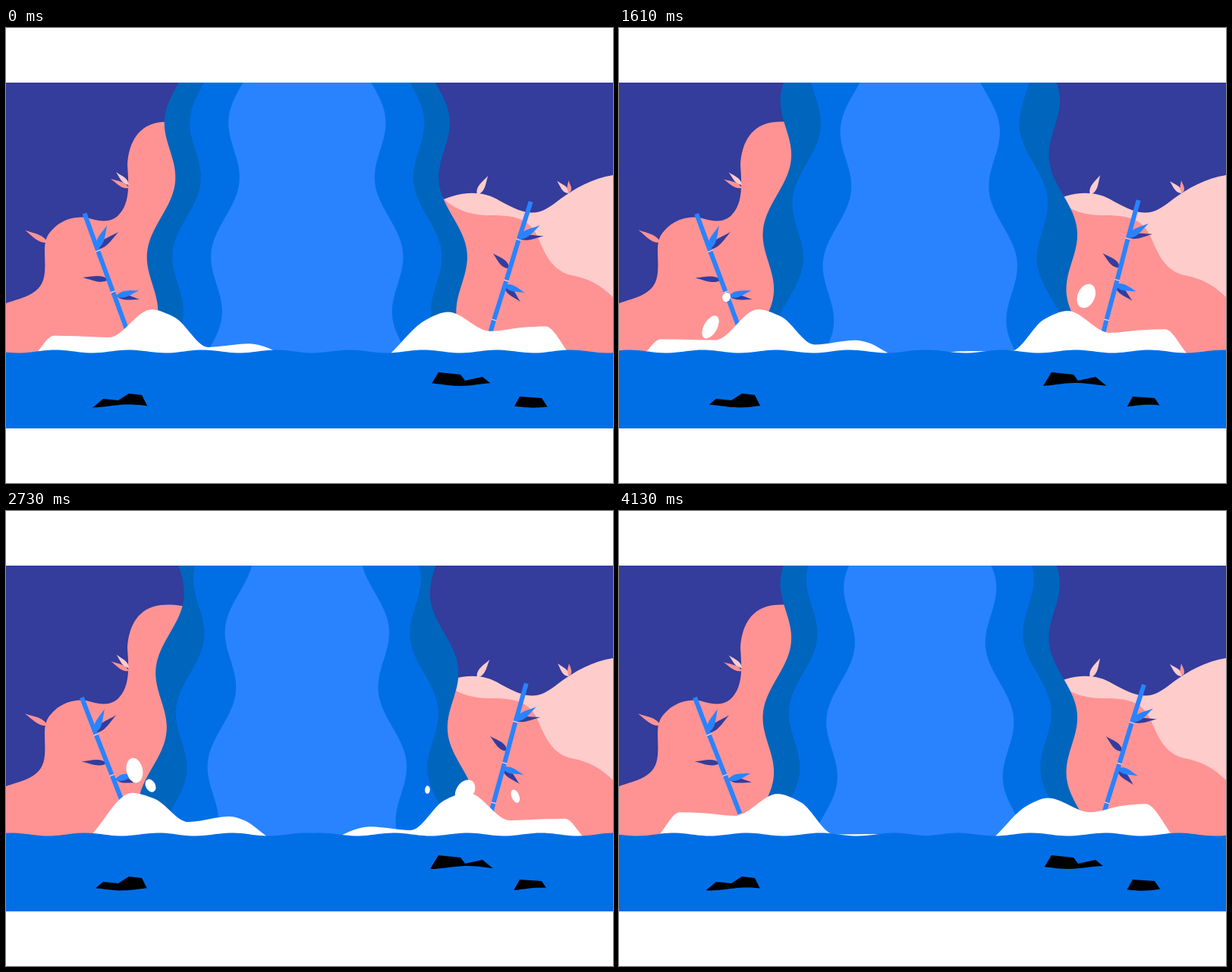
Write an HTML page that moves like this. It is 800x600 px and loops after 4200 ms.

```html
<!DOCTYPE html>
<html lang="en">
<head>
<meta charset="utf-8">
<title>Waterfall</title>
<style>
html, body { margin: 0; width: 100%; height: 100%; overflow: hidden; background: #fff; }
svg { display: block; width: 100vw; height: 100vh; }
</style>
</head>
<body>
<svg id="stage" viewBox="0 0 800 600">
  <defs><clipPath id="frame"><rect y="72" width="800" height="456"/></clipPath></defs>
  <g id="scene" clip-path="url(#frame)"></g>
</svg>
<script>
const LOOP = 4200, STEP = 70, TAU = Math.PI * 2;
const C = {
  sky: '#343c9c', pink: '#ff9393', pale: '#ffcccc', white: '#fff',
  deep: '#0065bd', water: '#006fe6', bright: '#2983ff'
};
const scene = document.getElementById('scene');

function add(tag, attrs, parent = scene) {
  const el = document.createElementNS('http://www.w3.org/2000/svg', tag);
  for (const key in attrs) el.setAttribute(key, attrs[key]);
  parent.appendChild(el);
  return el;
}
const shape = (fill, d = '', parent = scene) => add('path', { fill, d }, parent);
const mix = (a, b, k) => a + (b - a) * k;
const mod = (a, n) => ((a % n) + n) % n;
const polygon = pts => 'M' + pts.map(p => p[0].toFixed(2) + ',' + p[1].toFixed(2)).join('L') + 'Z';
const swing = (t, period, peak) => Math.cos(TAU * (t / period - peak));

function leaf(x, y, tipX, tipY, width, fill, parent) {
  const length = Math.hypot(tipX - x, tipY - y);
  const angle = Math.atan2(tipY - y, tipX - x) * 360 / TAU;
  const side = w => `${length * 0.3},${w * 1.3} ${length * 0.6},${w * 0.4}`;
  const back = w => `${length * 0.6},${w * 0.4} ${length * 0.3},${w * 1.3}`;
  shape(fill, `M0,0C${side(-width)} ${length},0C${back(width)} 0,0Z`, parent)
    .setAttribute('transform', `translate(${x} ${y}) rotate(${angle})`);
}

// Land
add('rect', { y: 72, width: 800, height: 456, fill: C.sky });
shape(C.pink, 'M0,363C22,355 49,352 51,322C53,300 46,281 60,267C72,253 90,248 106,250C120,254 137,259 149,246C165,229 161,200 160,180C162,150 175,127 205,124Q222,122 240,127V432H0Z');
shape(C.pale, 'M565,232C590,217 625,211 651,228C690,250 702,246 722,232C746,213 770,199 800,194V432H565Z');
shape(C.pink, 'M566,214C588,240 610,247 640,247C672,247 690,252 701,276C712,302 721,320 745,326C770,331 785,340 800,355V432H566Z');

// Swaying plants: root, swing in degrees, period, peak and resting swing
const plants = [];
function plant(x, y, degrees, period, peak, rest) {
  const el = add('g', {});
  plants.push({ el, x, y, degrees, period, peak, rest });
  return el;
}
let g = plant(55, 283, 2, 700, 0.2, 0);
leaf(55, 283, 25, 267, 5.5, C.pink, g);
g = plant(162, 209, 2, 840, 0.25, 0);
leaf(162, 207, 145, 190, 4.5, C.pale, g);
leaf(162, 211, 138, 199, 4.5, C.pink, g);
g = plant(621, 219, 5, 840, 0.25, -0.6);
leaf(621, 220, 634, 194, 6, C.pale, g);
g = plant(741, 216, 3, 840, 0.25, -0.4);
leaf(742, 218, 726, 202, 5, C.pale, g);
leaf(743, 217, 741, 201, 4, C.pink, g);

function bamboo(group, nodes, leaves) {
  leaves.forEach(l => leaf(...l, group));
  for (let i = 0; i + 1 < nodes.length; i++) {
    const [x1, y1] = nodes[i], [x2, y2] = nodes[i + 1];
    const length = Math.hypot(x2 - x1, y2 - y1);
    const ux = (x2 - x1) / length, uy = (y2 - y1) / length;
    const at = (along, side) => [x1 + ux * along - uy * side, y1 + uy * along + ux * side];
    shape(C.bright, polygon([at(0.7, 3), at(0.7, -3), at(length - 0.7, -3), at(length - 0.7, 3)]), group);
    const [ax, ay] = at(length, 3.5), [bx, by] = at(length, -3.5);
    add('path', { d: `M${ax},${ay}L${bx},${by}`, stroke: C.pale, 'stroke-width': 1.2 }, group);
  }
}
bamboo(plant(164, 410, 2.25, 700, 0.13, 0.64), [[103, 244], [121, 294], [141, 348], [160, 400], [165, 414]], [
  [119, 292, 148, 269, 6, C.sky], [119, 292, 133, 260, 6.5, C.bright], [135, 332, 101, 329, 5.5, C.sky],
  [145, 353, 176, 358, 5, C.sky], [145, 354, 175, 346, 6, C.bright]
]);
bamboo(plant(640, 400, 1.3, 1050, 0.95, 0.7), [[691, 228], [675, 279], [659, 333], [643, 385], [636, 410]], [
  [674, 277, 708, 274, 5, C.sky], [674, 278, 703, 260, 6.5, C.bright], [663, 317, 641, 297, 6, C.sky],
  [656, 339, 678, 361, 6, C.sky], [656, 339, 684, 349, 6, C.bright]
]);

// Waterfall layers
const layers = [[C.deep, 0, 420], [C.water, 33.5, 350], [C.bright, 84.5, 525]]
  .map(([fill, inset, period]) => ({ el: shape(fill), inset, period }));

function fall({ inset, period }, t) {
  const left = [], right = [];
  for (let y = 70; y <= 436; y += 4) {
    const x = 216 + inset - 0.13 * (y - 161) + 12.5 * Math.sin(TAU * ((y - 161) / 177 - t / period));
    left.push([x, y]);
    right.unshift([793.6 - x, y]);
  }
  return polygon(left.concat(right));
}

// Spray: each volley goes up on the right, then on the left
const FLIGHT = 600;
const ARC = { x: 596, span: 90, top: 341, gravity: 235 };
const BEAD_ARC = { x: 568, span: -22, top: 367, gravity: 40 };
const drops = [];
function drop(side, launch, size, arc = ARC) {
  drops.push({ el: add('ellipse', { fill: C.white }), side, launch, size, arc });
}
[642, 1478, 2088, 2670].forEach((launch, i) => {
  const sides = [[1, launch], [-1, launch + 412]];
  sides.forEach(([side, time]) => drop(side, time, 1));
  if (i % 2) return;
  sides.forEach(([side, time]) => drop(side, time + 140, 0.55));
  drop(i ? 1 : -1, launch + 300, 0.33, BEAD_ARC);
});

function moveDrop({ el, side, launch, size, arc }, t) {
  const u = (t - launch) / FLIGHT;
  const visible = u > 0 && u < 1;
  el.setAttribute('visibility', visible ? 'visible' : 'hidden');
  if (!visible) return;
  const x = arc.x + arc.span * u, y = arc.top + arc.gravity * (u - 0.45) ** 2;
  const squash = Math.exp(-(((u - 0.68) / 0.07) ** 2));
  const tilt = (40 - 75 * u) * side * Math.sign(arc.span);
  el.setAttribute('rx', (12 - 3.5 * u) * size);
  el.setAttribute('ry', (16.5 - 5.5 * squash) * size);
  el.setAttribute('transform', `translate(${side > 0 ? x : 800 - x} ${y}) rotate(${tilt})`);
}

// Foam: swells are born near the fall, drift outwards, grow and die
const FOAM = { period: 525, lead: 105, base: 428, born: 20, life: 1240 };
const crest = age => [
  454 + 0.245 * age,
  FOAM.base - 57 * Math.sin(Math.PI * (age - FOAM.born) / 1300)
];
const trough = age => [
  507 + 0.25 * age,
  FOAM.base - 31 * Math.sin(Math.PI * age / 860) ** 1.5
];

function foamPoints(time) {
  let age = FOAM.born + mod(time - FOAM.born, FOAM.period);
  const pts = [[424 + 0.16 * age, FOAM.base]];
  for (;;) {
    const [fromX, fromY] = pts[pts.length - 1], [x, y] = crest(age);
    pts.push([mix(fromX, x, 0.6), mix(fromY, y, 0.8)], [x, y]);
    if (age + FOAM.period > FOAM.life) break;
    pts.push(trough(age));
    age += FOAM.period;
  }
  pts.push([706 + 0.17 * (age - 840), FOAM.base]);
  return pts;
}

// Monotone cubic through points ordered by x
function smooth(pts, mapX) {
  const secant = pts.slice(1).map((p, i) => (p[1] - pts[i][1]) / (p[0] - pts[i][0]));
  const slope = pts.map((p, i) => {
    const a = secant[i - 1] ?? secant[i], b = secant[i] ?? a;
    return a * b > 0 ? 2 * a * b / (a + b) : 0;
  });
  let d = `M${mapX(pts[0][0])},434L${mapX(pts[0][0])},${pts[0][1]}`;
  for (let i = 0; i + 1 < pts.length; i++) {
    const [x1, y1] = pts[i], [x2, y2] = pts[i + 1], h = (x2 - x1) / 3;
    d += `C${mapX(x1 + h)},${y1 + slope[i] * h} ${mapX(x2 - h)},${y2 - slope[i + 1] * h} ${mapX(x2)},${y2}`;
  }
  return d + 'V434Z';
}
const foamLeft = shape(C.white), foamRight = shape(C.white);

// Water line, also lapping at the rocks; ripples run outwards from the middle
const MIDDLE = 404.5;
function ripple(from, to, level, bottom, t) {
  const pts = [[to, bottom], [from, bottom]];
  for (let x = from; x <= to; x += 5) {
    const phase = (MIDDLE - Math.abs(x - MIDDLE) - 65) / 97 + t / 1050;
    pts.push([x, level - 2 * Math.cos(TAU * phase)]);
  }
  return polygon(pts);
}
const water = shape(C.water);
const rocks = [
  ['M109,505L128,489L148,491L162,482L179,484L190,506Z', 100, 200, 498.4],
  ['M556,477L570,454L599,457L605,465L628,460L650,478Z', 550, 655, 470],
  ['M666,506L677,486L706,488L718,506Z', 660, 725, 498.7]
].map(([d, from, to, level]) => {
  shape('#000', d);
  return { el: shape(C.water), from, to, level };
});

function draw(t) {
  for (const p of plants) {
    const angle = p.degrees * (swing(t, p.period, p.peak) - p.rest);
    p.el.setAttribute('transform', `rotate(${angle} ${p.x} ${p.y})`);
  }
  layers.forEach(l => l.el.setAttribute('d', fall(l, t)));
  drops.forEach(d => moveDrop(d, t));
  foamRight.setAttribute('d', smooth(foamPoints(t), x => x));
  foamLeft.setAttribute('d', smooth(foamPoints(t + FOAM.lead), x => 800 - x));
  water.setAttribute('d', ripple(0, 800, 426.5, 530, t));
  rocks.forEach(r => r.el.setAttribute('d', ripple(r.from, r.to, r.level, r.level + 12, t)));
}

const began = performance.now();
function tick() {
  const t = (performance.now() - began) % LOOP;
  draw(Math.floor(t / STEP) * STEP);
  requestAnimationFrame(tick);
}
tick();
</script>
</body>
</html>
```
